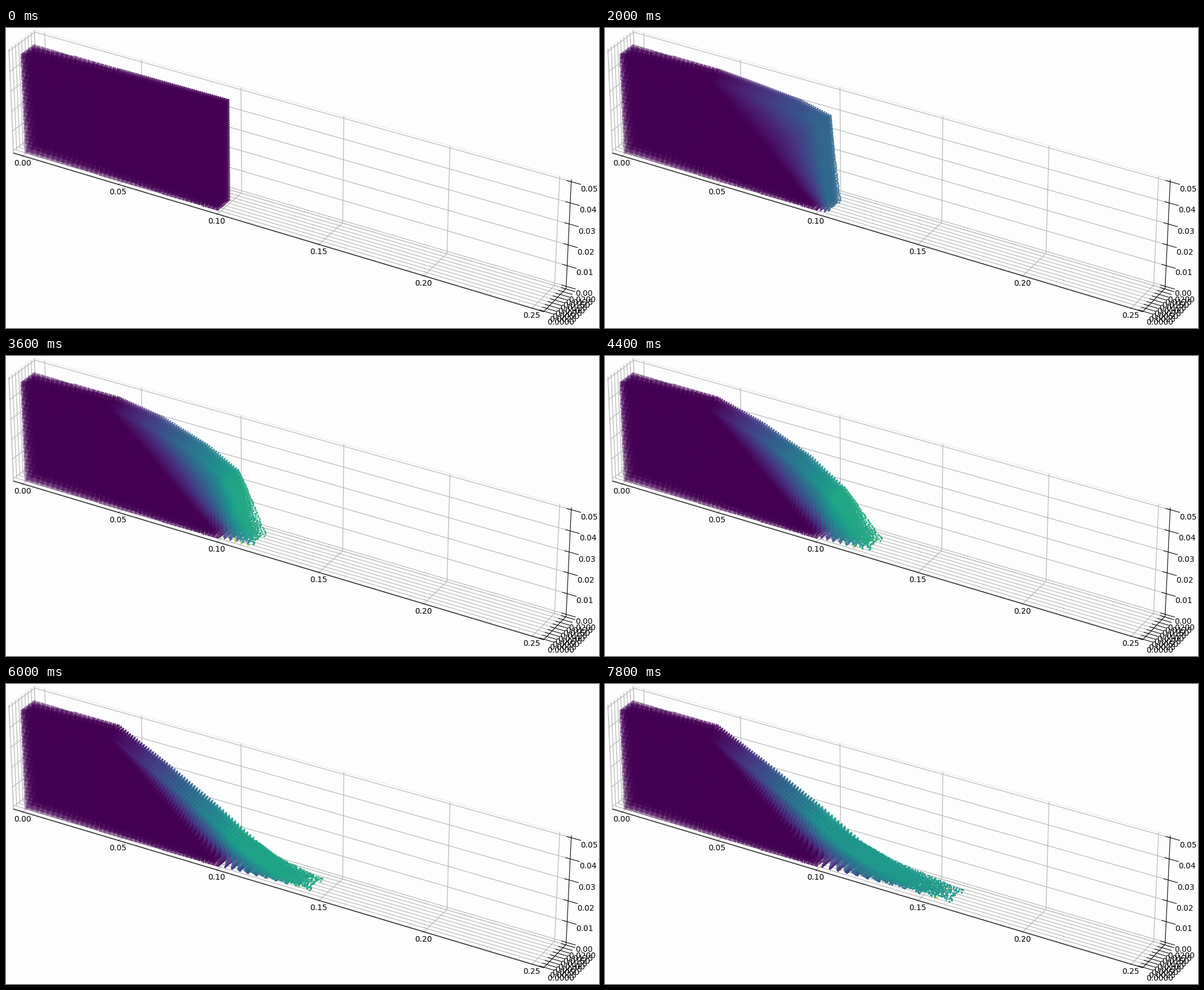
A matplotlib script that plays this animation: 1052 by 532 pixels, repeating every 8 s.

```python
import numpy as np
import matplotlib
import matplotlib.pyplot as plt
from matplotlib.animation import FuncAnimation
from matplotlib.collections import LineCollection

W, H, DPI = 1052, 532, 100
FRAMES, STEP = 40, 200
BLACK, GRID, PANE = "black", "#b0b0b0", "#e9e9e9"
DOT = 2.6                                   # marker diameter in points
SPAN = np.array([0.25, 0.02, 0.05])
LO, HI = -SPAN / 48, SPAN * 49 / 48         # box with its margins
(X0, Y0, Z0), (X1, Y1, Z1) = LO, HI

plt.rcParams["font.family"] = "DejaVu Sans"
viridis = matplotlib.colormaps["viridis"]
rng = np.random.default_rng(4)

# ---------------------------------------------------------------- camera
# points on edges of the box: (y, z) -> [(x, screen x, screen y), ...]
EDGES = {
    (Y0, Z0): [(X0, 12, 220.5), (0.1, 374, 328.5), (0.2, 740.5, 440), (X1, 953.5, 503)],
    (Y1, Z0): [(0.1, 418, 292), (0.15, 597, 345), (0.2, 782, 399), (X1, 992.5, 461.5)],
    (Y1, Z1): [(X0, 50, 4), (0.05, 239.5, 56), (0.1, 416.5, 104.5),
               (0.2, 788, 207.5), (X1, 1002, 268)],
    (Y0, Z1): [(X0, 4, 38)],
}


def fit_camera():
    rows, rhs = [], []
    for (y, z), marks in EDGES.items():
        for x, u, v in marks:
            p = np.array([x, y, z]) / SPAN
            h, zero = np.append(p, 1), np.zeros(4)
            u, v = u / 1000, v / 1000
            rows += [np.r_[h, zero, -u * p], np.r_[zero, h, -v * p]]
            rhs += [u, v]
    sol = np.linalg.lstsq(np.array(rows), np.array(rhs), rcond=None)[0]
    return np.append(sol, 1).reshape(3, 4)


CAMERA = fit_camera()


def project(x, y, z):
    x, y, z = np.broadcast_arrays(x, y, z)
    p = np.stack([x / SPAN[0], y / SPAN[1], z / SPAN[2], np.ones(x.shape)])
    u, v, w = np.tensordot(CAMERA, p, 1)
    return np.stack([u / w, v / w], axis=-1) * 1000


def nearness(x, y, z):
    return 0.45 * x - 0.755 * y + 0.476 * z


def shade(x, y, z):
    return 0.3 + 0.7 * np.clip((nearness(x, y, z) + 0.0075) / 0.076, 0, 1)


# ---------------------------------------------------------------- stage
fig = plt.figure(figsize=(W / DPI, H / DPI), dpi=DPI, facecolor="#fdfdfd")
ax = fig.add_axes([0, 0, 1, 1])
ax.set_xlim(-0.5, W - 0.5)
ax.set_ylim(H - 0.5, -0.5)
ax.axis("off")


def lines(paths, color, zorder):
    segs = [project(*np.array(p, float).T) for p in paths]
    ax.add_collection(LineCollection(segs, colors=color, linewidths=0.8, zorder=zorder))


def label(pos, dx, dy, text):
    ax.text(pos[0] + dx, pos[1] + dy, text, size=10, color=BLACK,
            ha="center", va="center", zorder=2)


def draw_box():
    xt, yt, zt = np.linspace(0, 0.25, 6), np.linspace(0, 0.02, 9), np.linspace(0, 0.05, 6)
    lines([[(X0, Y0, Z0), (X0, Y0, Z1), (X0, Y1, Z1), (X1, Y1, Z1)],
           [(X0, Y1, Z1), (X0, Y1, Z0), (X1, Y1, Z0)]], PANE, 0)
    grid = [[(x, Y0, Z0), (x, Y1, Z0), (x, Y1, Z1)] for x in xt]
    grid += [[(X0, y, Z1), (X0, y, Z0), (X1, y, Z0)] for y in yt]
    grid += [[(X0, Y0, z), (X0, Y1, z), (X1, Y1, z)] for z in zt]
    lines(grid, GRID, 1)

    dx, dy = (X1 - X0) / 12, (Y1 - Y0) / 12
    lines([[(X0, Y0, Z0), (X1, Y0, Z0), (X1, Y1, Z0), (X1, Y1, Z1)]], BLACK, 2)
    ticks = [[(x, Y0 + 0.1 * dy, Z0), (x, Y0 - 0.2 * dy, Z0)] for x in xt]
    near, far = X1 - 0.1 * dx, X1 + 0.2 * dx
    ticks += [[(near, y, Z0), (far, y, Z0)] for y in yt]
    ticks += [[(near, Y1, z), (far, Y1, z)] for z in zt]
    lines(ticks, BLACK, 2)

    for x in xt:
        label(project(x, Y0, Z0), -0.8, 13.3, f"{x:.2f}")
    for y in yt:
        label(project(X1, y, Z0), 29, 19.5, f"{y:.4f}")
    for z in zt:
        label(project(X1, Y1, z), 31.3, 13, f"{z:.2f}")


draw_box()

# ---------------------------------------------------------------- grains
PITCH = 0.001
gx, gy, gz = (a.ravel() for a in np.meshgrid(
    PITCH * np.arange(1, 101), PITCH * np.arange(11), PITCH * np.arange(1, 51),
    indexing="ij"))

# slip plane from (TOP, 0.05) down to (0.1, 0.001)
TOP, RUN, DROP = 0.045, 0.055, 0.049
SLOPE = DROP / RUN
lift = (gz - 0.05 + SLOPE * (gx - TOP)) / (1 + SLOPE)
slides = lift > 1e-9

# free surface of the sliding wedge at some times, as (x, z) in mm
NODES = np.array([0, 0.2, 0.4, 0.529, 0.68, 0.84, 1])
TIMES = np.array([0, 2, 3.6, 5.2, 6, 7.8])
SURFACE = np.array([
    [(45, 50), (65.8, 50), (86.6, 50), (100, 50), (100, 34.3), (100, 17.6), (100, 1)],
    [(45, 50), (66, 48.3), (87.3, 46.2), (101.5, 42.8), (102.7, 29), (104.2, 14.5), (106, 1.2)],
    [(45, 50), (67.5, 46.3), (90, 38.8), (104.5, 30.8), (108.5, 23.5), (112.5, 14.5), (118.3, 2.2)],
    [(45, 50), (69, 40.6), (94, 28.7), (112, 16.3), (119, 11.3), (127, 6.2), (136.5, 2.8)],
    [(45, 50), (69, 38.2), (95, 24), (115, 11.4), (123.5, 7.4), (134.5, 4.8), (146.5, 2.8)],
    [(45, 50), (69, 38.7), (96.5, 24.7), (118, 12), (132, 8), (149, 5.5), (167, 3.2)],
]) / 1000
SPEED = np.gradient(SURFACE, TIMES, axis=0)
SPEED[0] = 0
SPEED[4, :, 1] = 0


def surface(t):
    k = min(np.searchsorted(TIMES, t, side="right") - 1, len(TIMES) - 2)
    h = TIMES[k + 1] - TIMES[k]
    q = (t - TIMES[k]) / h
    ease = q * q * (3 - 2 * q)
    return (SURFACE[k] * (1 - ease) + SURFACE[k + 1] * ease
            + h * q * (1 - q) * ((1 - q) * SPEED[k] - q * SPEED[k + 1]))


def draw_static():
    x, y, z = gx[~slides], gy[~slides], gz[~slides]
    pos, alpha = project(x, y, z), shade(x, y, z)
    bins = np.linspace(0.3, 1.0, 11)
    for a, b in zip(bins[:-1], bins[1:]):
        part = pos[(alpha >= a) & (alpha < b)]
        ax.plot(part[:, 0], part[:, 1], "o", ms=DOT, mew=0, color=viridis(0.0),
                alpha=(a + b) / 2, zorder=3)


draw_static()

mx, my, mz, lift = gx[slides], gy[slides], gz[slides], lift[slides]
along = np.clip((mx - lift - TOP) / RUN, 0, 1)
reach = np.minimum(DROP * along, RUN * (1 - along))
level = np.clip(lift / np.maximum(reach, 1e-9), 0, 1)
side = (my / 0.005 - 1) ** 2                # 1 at both side walls, 0 midway
noise = rng.normal(0, 1, (2, mx.size))
bright = rng.uniform(0.82, 0.95, mx.size)

dots = ax.scatter(mx, mz, s=DOT ** 2, marker="8", linewidths=0, zorder=4)


def base(t, toe):
    """Foot of each grain's line: down the slip plane, then along the floor."""
    length = np.hypot(RUN, DROP)
    arc = along * length + (toe - 0.1) * along ** 6
    down = np.minimum(arc / length, 1)
    over = np.maximum(arc - length, 0)
    return (TOP + RUN * down + over,
            0.05 - DROP * down + 0.0016 * np.minimum(over / 0.04, 1))


def grains(t):
    curve = surface(t)
    toe = curve[-1, 0]
    bx, bz = base(t, toe)
    sx = np.interp(along, NODES, curve[:, 0])
    sz = np.interp(along, NODES, curve[:, 1])
    x, z = bx + level * (sx - bx), bz + level * (sz - bz)

    front = np.clip((x - 0.1) / max(toe - 0.1, 1e-6), 0, 1) * min(t / 4, 1)
    x = x - 0.0016 * (1 - side) * front ** 2 + 0.0003 * noise[0] * front
    z = np.maximum(z + 0.00025 * noise[1] * front, 0.001)

    cap = 0.6 - 0.022 * max(t - 5.2, 0)
    depth = level * (1.4 - 0.4 * level)
    speed = np.clip((x - TOP) / 0.063 * 0.6, 0, cap) * min(t / 3.3, 1)
    speed = speed * (depth + (1 - depth) * front)
    if t > 3:
        fast = (x > toe - 0.01) & (side > 0.9) & (level < 0.35)
        speed = np.where(fast, bright, speed)
    return x, z, speed


def update(i):
    x, z, speed = grains(i * STEP / 1000)
    order = np.argsort(nearness(x, my, z))
    rgba = viridis(speed)
    rgba[:, 3] = shade(x, my, z)
    dots.set_offsets(project(x, my, z)[order])
    dots.set_facecolors(rgba[order])
    return [dots]


anim = FuncAnimation(fig, update, frames=FRAMES, interval=STEP, repeat=True)
plt.show()
```
